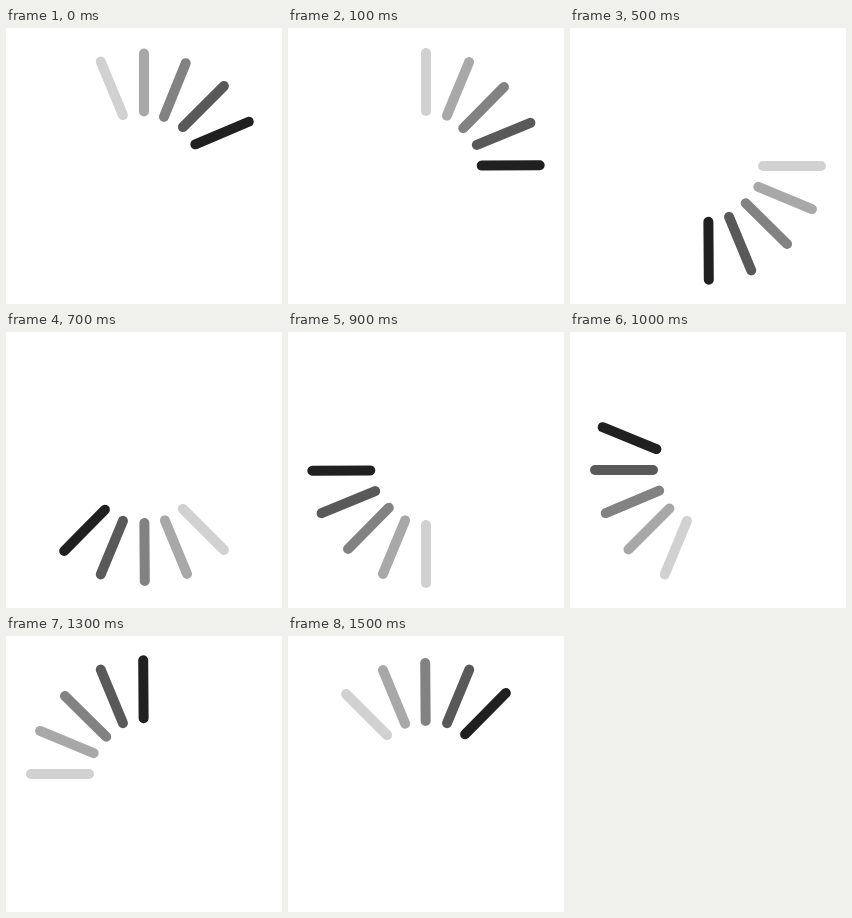
Write an HTML page that moves like this. It is 276 by 276 pixels and loops after 1.6 s.

```html
<!DOCTYPE html>
<html lang="en">
<head>
<meta charset="utf-8">
<title>Spinner</title>
<style>
  html, body { margin: 0; width: 100%; height: 100%; overflow: hidden; background: #fff; }
  svg { display: block; width: 100vw; height: 100vh; }
</style>
</head>
<body>
<svg viewBox="0 0 276 276">
  <g id="spinner" stroke-width="10" stroke-linecap="round"></g>
</svg>
<script>
const STEPS = 16, STEP_MS = 100, STEP_DEG = 360 / STEPS, BAR_LENGTH = 58;
const spinner = document.getElementById('spinner');

// Head to tail; start is the distance of the inner end from the centre.
const bars = [
  { color: '#212021', start: 55.7, tilt: -0.4 },
  { color: '#595959', start: 55, tilt: 0 },
  { color: '#828282', start: 53, tilt: -0.4 },
  { color: '#a8a8a8', start: 54.5, tilt: 0 },
  { color: '#d1d1d1', start: 55, tilt: 0 }
];

spinner.innerHTML = bars.map(({ color, start, tilt }, i) =>
  `<path d="M${start} 0h${BAR_LENGTH}" stroke="${color}" transform="rotate(${tilt - i * STEP_DEG})"/>`
).join('');

function draw() {
  const step = Math.floor(performance.now() / STEP_MS) % STEPS;
  spinner.setAttribute('transform', `translate(138 138) rotate(${(step - 1) * STEP_DEG})`);
  requestAnimationFrame(draw);
}
draw();
</script>
</body>
</html>
```
